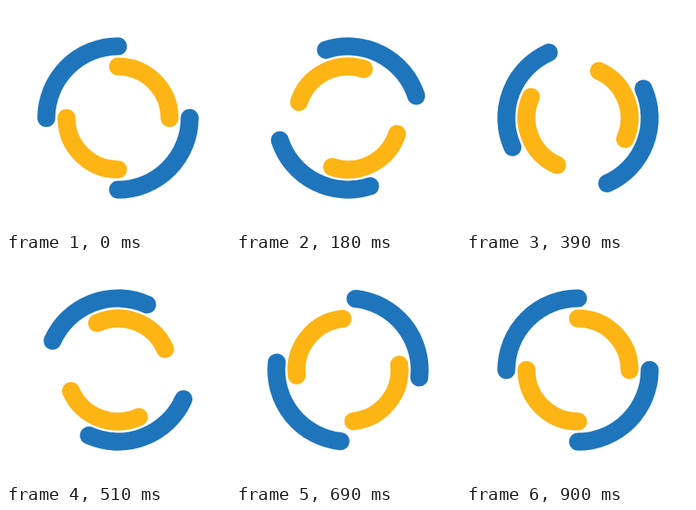
Recreate the animation shown at these times as an HTML page. Size 280 by 280 pixels, loop 930 ms.

```html
<!DOCTYPE html>
<html lang="en">
<head>
<meta charset="utf-8">
<title>Dual ring spinner</title>
<style>
  html, body { margin: 0; width: 100%; height: 100%; overflow: hidden; background: #fff; }
  svg { display: block; width: 100%; height: 100%; }
  path { fill: none; stroke-width: 8; stroke-linecap: round; }
</style>
</head>
<body>
<svg viewBox="0 0 100 100">
  <path id="outer" stroke="#1f75bc" d="M18 50A32 32 0 0 1 50 18M82 50A32 32 0 0 1 50 82"/>
  <path id="inner" stroke="#fdb415" d="M50 27A23 23 0 0 1 73 50M50 73A23 23 0 0 1 27 50"/>
</svg>
<script>
  const LOOP = 930, STEP = 30, DEGREES_PER_STEP = 12;
  const outer = document.getElementById('outer');
  const inner = document.getElementById('inner');

  const rotate = (ring, angle) => ring.setAttribute('transform', `rotate(${angle} 50 50)`);

  // One full turn in 30 steps; the last step rests in the starting pose.
  function draw() {
    const angle = Math.floor(performance.now() % LOOP / STEP) * DEGREES_PER_STEP;
    rotate(outer, angle);
    rotate(inner, -angle);
    requestAnimationFrame(draw);
  }
  draw();
</script>
</body>
</html>
```
